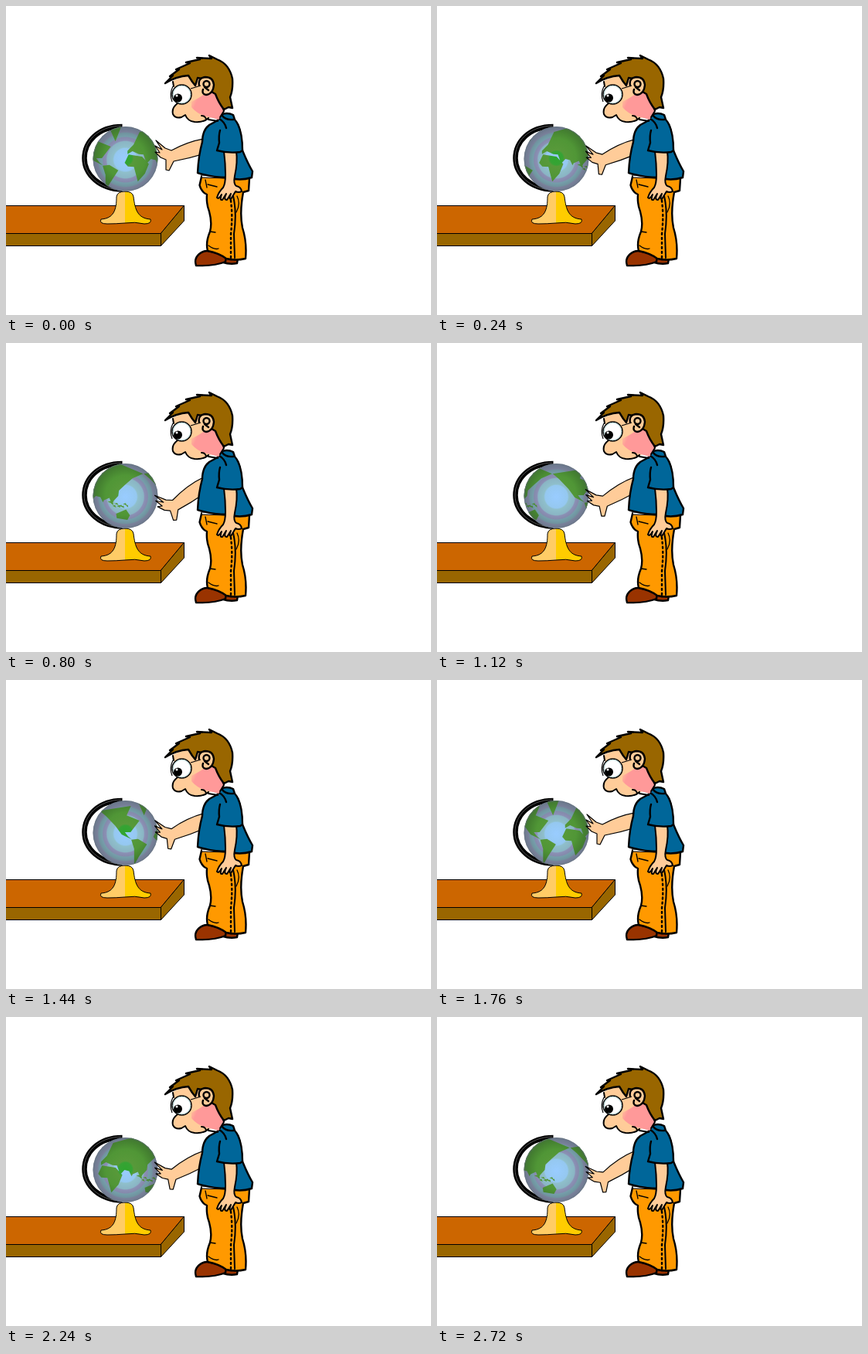
An HTML page for the animation above (2.8 s loop, 550x400 px).

```html
<!DOCTYPE html>
<html lang="en">
<head>
<meta charset="utf-8">
<title>Spinning globe</title>
<style>
html, body { margin: 0; width: 100%; height: 100%; overflow: hidden; background: #fff; }
svg { display: block; width: 550px; height: 400px; }
.ink { stroke: #000; stroke-linejoin: round; stroke-linecap: round; }
.bold { stroke-width: 2.4; }
.line { fill: none; }
.skin { fill: #ffcc99; }
.shirt { fill: #006699; }
</style>
</head>
<body>
<svg viewBox="0 0 550 400">
  <defs>
    <radialGradient id="sea" gradientUnits="userSpaceOnUse" cx="154.5" cy="199" r="43">
      <stop offset="0" stop-color="#99ccff"/><stop offset=".34" stop-color="#95c8f0"/>
      <stop offset=".38" stop-color="#8fbfcb"/><stop offset=".55" stop-color="#8ab5c4"/>
      <stop offset=".58" stop-color="#8b90b5"/><stop offset=".67" stop-color="#858aac"/>
      <stop offset=".7" stop-color="#759eaa"/><stop offset=".8" stop-color="#70949f"/>
      <stop offset=".84" stop-color="#79809a"/><stop offset="1" stop-color="#687789"/>
    </radialGradient>
    <radialGradient id="land" gradientUnits="userSpaceOnUse" cx="154.5" cy="197" r="43">
      <stop offset="0" stop-color="#2fa52f"/><stop offset=".2" stop-color="#36a334"/>
      <stop offset=".25" stop-color="#58993a"/><stop offset=".6" stop-color="#509636"/>
      <stop offset=".85" stop-color="#448030"/><stop offset="1" stop-color="#426f3a"/>
    </radialGradient>
    <linearGradient id="blush" gradientUnits="userSpaceOnUse" x1="238" y1="120" x2="247" y2="124">
      <stop offset="0" stop-color="#ffcc99"/><stop offset="1" stop-color="#ff9999"/>
    </linearGradient>
    <clipPath id="ball"><circle cx="154.5" cy="198" r="42"/></clipPath>
  </defs>

  <!-- table -->
  <g class="ink">
    <path fill="#cc6600" d="M-2 258.5H230.500L200.500 294.500H-2Z"/>
    <path fill="#996600" d="M-2 294.500H200.500V310.500H-2ZM230.500 258.500V278L200.500 310.500V294.500Z"/>
  </g>

  <!-- stand -->
  <path fill="#ffcc66" d="M154 240Q144 240 143 247C143 263 140 275 123 276Q120 282 131 282Q142 282 154 281Z"/>
  <path fill="#ffcc00" d="M154 240Q164 240 165 247C167 263 170 275 187 276Q189 282 179 282Q167 279 154 281Z"/>
  <path class="ink line" d="M154 240Q144 240 143 247C143 263 140 275 123 276Q120 282 131 282Q142 282 154 281Q167 279 179 282Q189 282 187 276C170 275 167 263 165 247Q164 240 154 240"/>

  <!-- mount -->
  <path class="line" stroke="#000" stroke-width="6.5" d="M150.500 156C119 156 101.500 176 101.500 197S121 237 150.500 237.500"/>
  <path class="line" stroke="#777" stroke-width=".7" d="M149 155C118 156 101 176 101 197S121 237.500 149 238"/>

  <!-- globe -->
  <circle cx="154.5" cy="198" r="42" fill="url(#sea)"/>
  <path id="lands" fill="url(#land)" clip-path="url(#ball)"/>
  <circle cx="154.5" cy="198" r="41.5" fill="none" stroke="#68717f" stroke-opacity=".55"/>

  <!-- reaching arm -->
  <path id="arm" class="ink skin" stroke-width="1.2" d="M262 171Q238 174 214 187L206 184L194 174L202 186L193 181L199 190L193 189L200 196L207 199V212L211 213L217 201Q238 197 257 191"/>

  <!-- shoes and trousers -->
  <g class="ink bold">
    <path fill="#993300" d="M268 326Q284 336 299 333L300 327Z"/>
    <path fill="#993300" d="M246 336Q243 327 250 321Q257 315 266 318L285 323L284 331Q270 337 246 336Z"/>
    <path fill="#ff9900" d="M253 221L250.500 232Q253 241 260 244Q259 256 263 266Q267 281 264 292Q258 306 261 317Q276 320 285 327Q297 330 310 327Q312 306 306 287Q302 268 307 241L314 239L315 223Z"/>
  </g>
  <g class="ink line" stroke-width="1.3">
    <path d="M258 225L260 235M261 231L273 234M299 246Q304 256 298 267M264 292L271 293M262 310Q270 316 275 314"/>
    <path d="M294 246Q299 268 295 295L296 326" stroke-width="2"/>
    <path d="M290 246Q294 268 291 295V326" stroke-dasharray="2 4" stroke-width="2.4"/>
  </g>

  <!-- shirt and hanging arm -->
  <path fill="#fff" class="ink" d="M253 219L284 220V223L254 222Z"/>
  <path class="ink bold shirt" d="M277 141Q286 137 294 141L296 147Q302 153 304 169L306 187Q313 204 319 214L318 222Q302 227 287 222Q266 222 248 216Q249 194 254 176Q254 161 263 154L274 148Z"/>
  <path class="ink skin" stroke-width="2" d="M282 188Q284 204 284 218Q284 230 281 235Q275 241 273 248Q275 251 279 244Q276 252 280 251L285 243Q281 251 286 251L291 243Q288 250 291 250L297 240Q301 242 305 240Q304 234 298 233Q294 230 296 220Q300 202 298 188Z"/>
  <path class="ink bold shirt" d="M277 161Q275 168 276 177L273 187Q288 191 303 189L306 187Q306 165 300 153"/>
  <path class="ink line bold" d="M276 146Q283 150 285 158M279 141Q284 148 294 147"/>

  <!-- face -->
  <path class="skin" d="M216 97L222 126Q214 132 216 140Q219 146 227 144L232 141Q235 149 244 150Q254 151 261 146L280 139L277 114L258 88H234Z"/>
  <path fill="url(#blush)" d="M240 124Q250 119 257 114L265 110L273 116L283 136L275 147L260 143Q249 141 240 131Z"/>
  <path class="ink line" stroke-width="2" d="M222 126Q214 132 216 140Q219 146 227 144L232 141Q235 149 244 150Q256 151 262 145M262 147L274 149M216 98L217 104M253 142Q258 142 259 147M277 121L282 136L277 144"/>

  <!-- hair -->
  <path fill="#996600" class="ink bold" d="M206 100L216 90L212 91L224 82L220 82L238 74L233 73L251 69L247 67L266 68L263 64L273 69Q289 75 293 94Q294 108 290 118L293 132L288 131L282 134Q275 125 271 114L266 111L265 96L248 93L245 103L241 98L236 90Q220 91 206 100Z"/>

  <!-- ear -->
  <path class="ink bold skin" d="M250 103Q248 93 258 92Q268 92 269 102Q268 114 259 115Q253 114 255 108"/>
  <circle class="ink line bold" cx="259.500" cy="101" r="4"/>
  <path class="ink line bold" d="M257 105L262 109"/>

  <!-- eye and glasses -->
  <path class="line" stroke="#000" stroke-width="1.2" d="M216 104Q211 114 215 124M239 107L252 103"/>
  <circle cx="227.500" cy="114.500" r="12.500" fill="#fff" stroke="#000" stroke-width="1.5"/>
  <circle cx="227.500" cy="114.500" r="11.200" fill="none" stroke="#a8cccc"/>
  <circle cx="222.500" cy="119" r="5.500"/>
  <circle cx="221" cy="116" r="1.500" fill="#fff"/>
</svg>
<script>
const STEP = 80, LOOP = 2800;
const CX = 154.5, EQUATOR = 210, SCALE = 0.46; // px per degree
const START = -15, SPIN = 0.194;               // degrees, degrees per ms

// Rough coasts, longitude,latitude corners
const coasts = {
  eurasia: "-9,37 -9,44 8,55 25,71 105,77 190,66 160,60 140,50 122,38 120,25 107,12 103,2 95,20 80,14 77,8 70,22 57,25 45,13 36,36 23,37 5,43",
  africa: "-17,15 -6,36 32,31 51,12 40,-15 20,-35 9,4 -8,5",
  north: "-168,66 -80,71 -92,60 -56,52 -81,27 -97,27 -88,16 -78,8 -106,21 -124,42 -150,59",
  south: "-79,7 -60,9 -35,-6 -58,-38 -71,-54 -71,-18",
  australia: "114,-23 142,-12 153,-27 146,-38 116,-34",
  greenland: "-65,77 -20,79 -43,60"
};
const shapes = Object.values(coasts).map(s => s.split(" ").map(p => p.split(",").map(Number)));

let seed = 7;
function random() {
  seed = seed * 16807 % 2147483647;
  return seed / 2147483647;
}

// Small islands between Asia and Australia
for (let i = 0; i < 9; i++) {
  const lon = 97 + i * 6, lat = 8 - 16 * random(), w = 3 + 4 * random();
  shapes.push([[lon - w, lat + 2], [lon + 2, lat + 4], [lon + w, lat - 3]]);
}

// Cylindrical map that slides behind the round window
function mapY(lat) {
  return EQUATOR - SCALE * 180 / Math.PI * Math.log(Math.tan(Math.PI / 4 + lat * Math.PI / 360));
}

function outline(shape, mid) {
  return "M" + shape.map(([lon, lat]) =>
    (CX + SCALE * (lon - mid)).toFixed(2) + " " + mapY(lat).toFixed(2)).join("L") + "Z";
}

function landPath(mid) {
  return [-360, 0, 360].map(turn => shapes.map(s => outline(s, mid + turn)).join("")).join("");
}

// The hand sinks for 800 ms and rises for 960 ms
function swing(t) {
  const u = t % 1760;
  return u < 800 ? u / 800 : (1760 - u) / 960;
}

const lands = document.getElementById("lands");
const arm = document.getElementById("arm");

function draw(ms) {
  const t = Math.floor((ms % LOOP) / STEP) * STEP;
  const mid = (START + SPIN * t + 180) % 360 - 180;
  const p = swing(t);
  lands.setAttribute("d", landPath(mid));
  arm.setAttribute("transform", `translate(${-3 * p} ${2 * p}) rotate(${-18 * p} 262 180)`);
}

const start = performance.now();
function tick(now) {
  draw(Math.max(0, now - start));
  requestAnimationFrame(tick);
}
draw(0);
requestAnimationFrame(tick);
</script>
</body>
</html>
```
